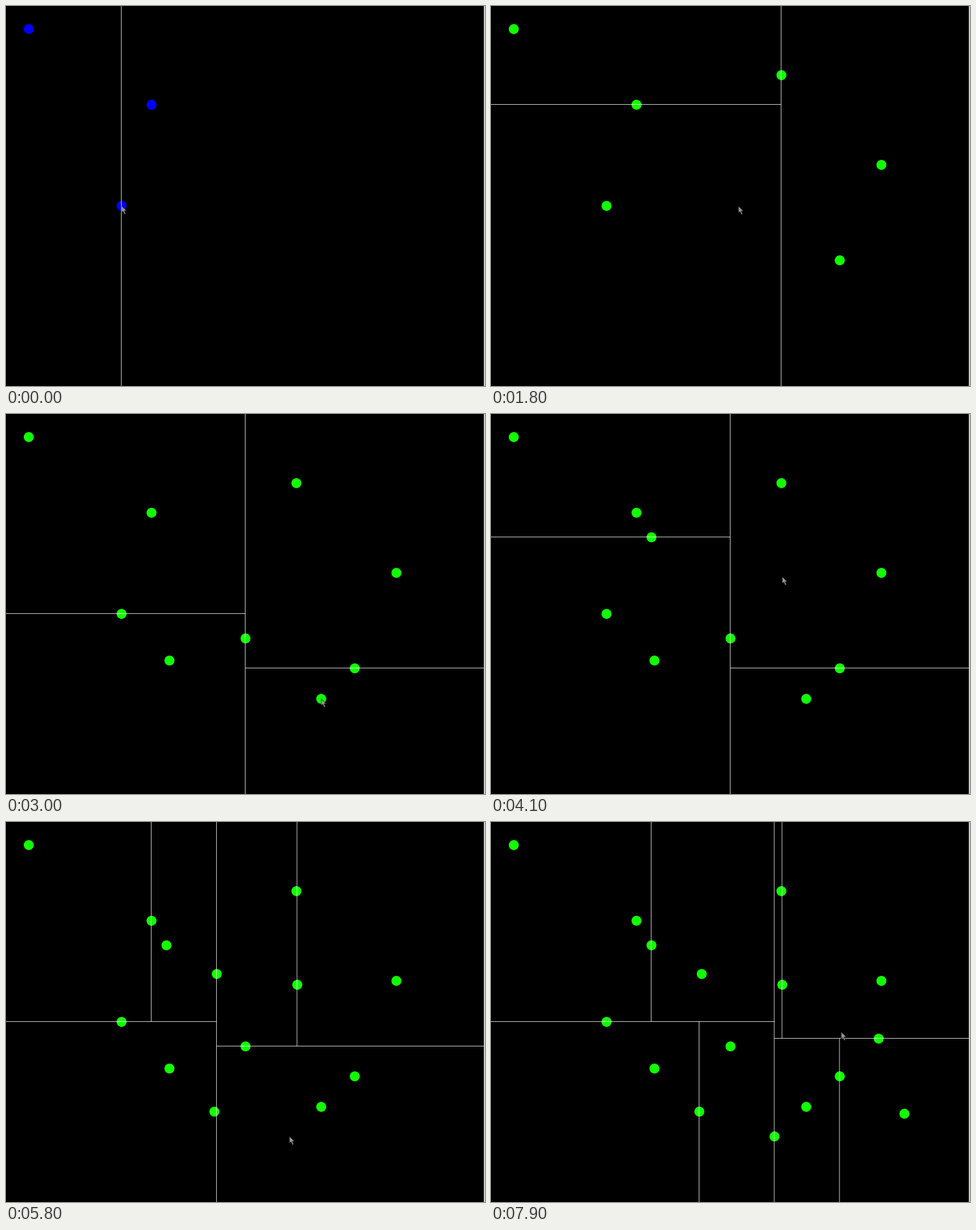
These frames come from a looping animation (800 px wide and 635 px high, 8 s). A matplotlib script:

```python
import matplotlib.pyplot as plt
from matplotlib.animation import FuncAnimation
from matplotlib.collections import LineCollection
from matplotlib.patches import Circle, Polygon, Rectangle

W, H, DPI = 800, 635, 100
RIGHT = 798
FRAMES, INTERVAL = 80, 100
RADIUS = 8.3
BLUE, GREEN = "#0000ff", "#12ff00"

# Points in the order they are clicked; the first three are there at the start.
POINTS = [
    (38, 38.5), (243, 165), (193, 334), (582.5, 425), (652, 265.5),
    (485, 115.5), (400, 375), (273, 412), (526.5, 476), (268, 206),
    (486.5, 272), (352, 254), (348, 484), (473.5, 525.5), (690.5, 487.5),
    (647.5, 362),
]
FIRST = 3
STOPS = POINTS[FIRST - 1:] + [(585, 351)]
ARROW = [(0, 0), (0, 11), (2.6, 8.8), (4.8, 14), (6.8, 13.1),
         (4.6, 8.2), (8, 8)]


def click_frame(k):
    """Clicks come every half second, then slightly slower after a pause."""
    return 5 * k if k <= 6 else int(37 + 5.67 * (k - 7))


def split(points, box, axis=0):
    """Return the dividing lines of a k-d tree, cut at the upper median."""
    if len(points) < 3:
        return []
    points = sorted(points, key=lambda p: p[axis])
    mid = len(points) // 2
    cut = points[mid][axis] - 0.5
    x0, y0, x1, y1 = box
    if axis == 0:
        line = [(cut, y0), (cut, y1)]
        low, high = (x0, y0, cut, y1), (cut, y0, x1, y1)
    else:
        line = [(x0, cut), (x1, cut)]
        low, high = (x0, y0, x1, cut), (x0, cut, x1, y1)
    return ([line] + split(points[:mid], low, 1 - axis)
            + split(points[mid + 1:], high, 1 - axis))


def pointer_at(frame, k):
    """Ease from stop k to the next one, arriving a frame before its click."""
    start, end = click_frame(k), click_frame(k + 1) - 1
    u = min((frame - start) / (end - start), 1)
    u = u * u * (3 - 2 * u)
    return [a + (b - a) * u for a, b in zip(STOPS[k], STOPS[k + 1])]


fig = plt.figure(figsize=(W / DPI, H / DPI), dpi=DPI, facecolor="black")
ax = fig.add_axes([0, 0, 1, 1])
ax.set_xlim(0, W)
ax.set_ylim(H, 0)
ax.axis("off")

ax.add_patch(Rectangle((RIGHT, 0), W - RIGHT, H, color="#cccccc", lw=0))
dots = [ax.add_patch(Circle(p, RADIUS, lw=0, zorder=2)) for p in POINTS]
# Snapping would push lines on pixel centres to the next pixel.
lines = ax.add_collection(LineCollection(
    [], colors=[(1, 1, 1, 0.82)], linewidths=72 / DPI, capstyle="butt",
    snap=False, zorder=3), autolim=False)
pointer = ax.add_patch(Polygon(ARROW, facecolor="#999999",
                               edgecolor="#202020", lw=0.5, zorder=4))


def update(frame):
    last = len(POINTS) - FIRST
    k = max(i for i in range(last + 1) if click_frame(i) <= frame)
    active = POINTS[:FIRST + k]
    for i, dot in enumerate(dots):
        dot.set_visible(i < len(active))
        dot.set_facecolor(GREEN if k else BLUE)
    lines.set_segments(split(active, (0, 0, RIGHT, H)))
    px, py = pointer_at(frame, k)
    pointer.set_xy([(px + x, py + y) for x, y in ARROW])
    return [*dots, lines, pointer]


anim = FuncAnimation(fig, update, frames=FRAMES, interval=INTERVAL,
                     repeat=True, repeat_delay=0)
plt.show()
```
